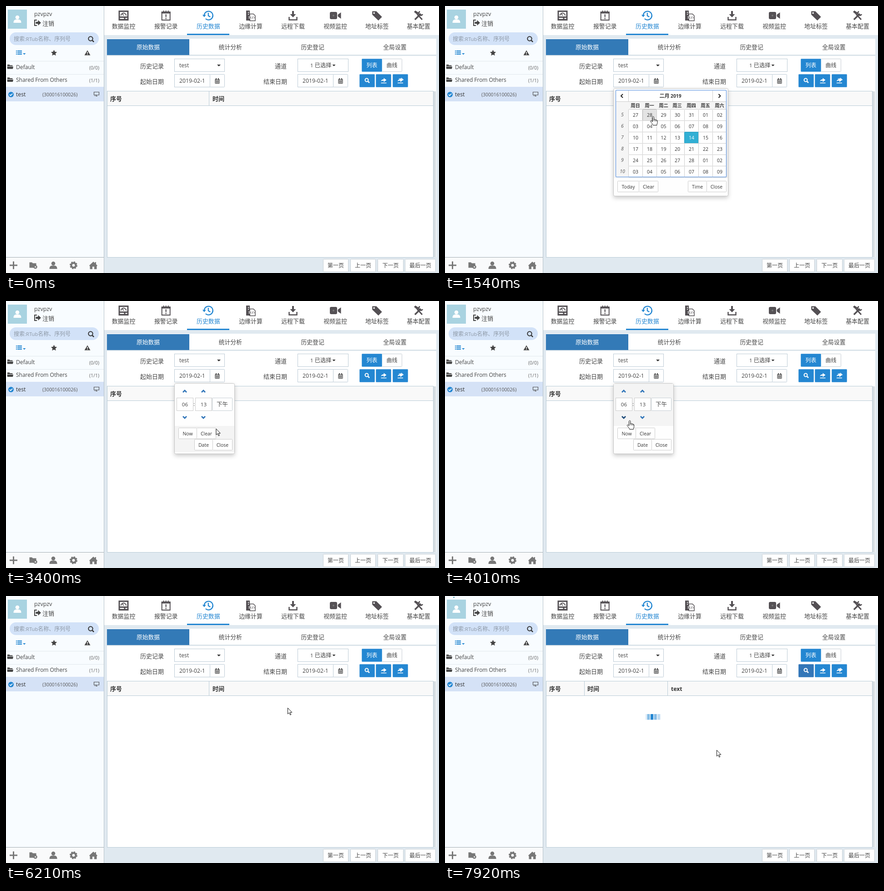
Write an HTML page that moves like this. It is 952 by 588 pixels and loops after 7990 ms.

```html
<!DOCTYPE html>
<html lang="zh">
<head>
<meta charset="utf-8">
<title>历史数据</title>
<style>
html, body { margin: 0; width: 100%; height: 100%; overflow: hidden; background: #e0e9f0; }
svg { display: block; width: 952px; height: 588px; font-family: "Open Sans", "Noto Sans CJK SC", "Noto Sans CJK", sans-serif; }
.s { fill: none; stroke: currentColor; }
.w { fill: #fff; }
.b.hot rect { fill: #e4e4e4; stroke: #a5a5a5; }
.b.down rect { fill: #d2d2d2; stroke: #999; }
.b.p.hot rect, .b.p.down rect { fill: #3276b8; stroke: #5b93c8; }
.b.sel rect { fill: #31afd4; stroke: #269abc; }
.b.arrow rect { fill: none; stroke: none; }
.b.arrow { color: #2f74b8; }
.b.arrow.hot { color: #1c4a78; }
.b.arrow.focus rect { stroke: #7fabe8; stroke-width: 1.5; }
.pop { filter: drop-shadow(0 4px 5px rgba(0, 0, 0, .2)); }
</style>
</head>
<body>
<svg id="stage" viewBox="0 0 952 588"></svg>
<script>
const BLUE = '#2487d2', GREY = '#555', LINE = '#bccbd6', DARK = '#444', LOOP = 7990;

// ---- drawing helpers ----
const rect = (x, y, w, h, fill, more = '') =>
  `<rect x="${x}" y="${y}" width="${w}" height="${h}" fill="${fill}" ${more}/>`;
const box = (x, y, w, h, fill = '#fff', stroke = LINE, more = '') =>
  rect(x + .5, y + .5, w, h, fill, `stroke="${stroke}" ${more}`);
const path = (d, more = '') => `<path d="${d}" ${more}/>`;
const stroke = (d, w = 2) => path(d, `class="s" stroke-width="${w}"`);
const icon = (x, y, color, body) =>
  `<g transform="translate(${x} ${y})" color="${color}" fill="currentColor">${body}</g>`;
// Latin runs are set slightly smaller than the Chinese ones
const text = (x, y, s, size = 13, color = DARK, more = '') =>
  `<text x="${x}" y="${y}" font-size="${size}" fill="${color}" ${more}>` +
  s.replace(/[ -~]+/g, run => `<tspan font-size="${size * .935}">${run}</tspan>`) + '</text>';
const mid = (x, y, s, size, color, more = '') =>
  text(x, y, s, size, color, 'text-anchor="middle" ' + more);
const button = (x, y, w, h, label = '', opt = {}) =>
  `<g class="b ${opt.cls || ''}" ${opt.id ? `id="${opt.id}"` : ''}>` +
  box(x, y, w, h, opt.fill, opt.stroke || '#c6ced4', 'rx="1"') +
  (label && mid(x + w / 2 + .5, y + h / 2 + (opt.size || 12) * .38 + .3, label, opt.size || 12, opt.color)) +
  (opt.body || '') + '</g>';
const bold = 'font-weight="bold"';
const caret = (x, y, color) => path(`M${x} ${y}h8l-4 4z`, `fill="${color}"`);
const cog = (r = 1) => `<g transform="scale(${r})"><circle r="5" class="s" stroke-width="4"/>` +
  '<circle r="7" class="s" stroke-width="3" stroke-dasharray="3.3 2.2"/></g>';
const person = '<circle cy="-4" r="4.3"/>' + path('M-8.5 8c0-7 4-7.5 8.5-7.5s8.5 .5 8.5 7.5z');
const lens = (r, w) => `<circle cx="-1" cy="-1" r="${r}" class="s" stroke-width="${w}"/>` +
  stroke(`M${r * .6} ${r * .6}L${r + 1.5} ${r + 1.5}`, w + .5);
const calendarIcon = stroke('M-4.5-3.5h9v9h-9zM-4.5-1h9M-1.5-1v6.5M1.5-1v6.5M-4.5 2.2h9', 1) +
  stroke('M-2.5-6v3.5M2.5-6v3.5', 1.7);

// ---- sidebar ----
function sidebar() {
  const folder = y => icon(9, y, DARK, path('M-6-5h4.5l1.5 1.5h5.5v2h-11.5zM-6.5-.5h13.5l-1 5h-12z'));
  return rect(0, 0, 215, 553, '#f8fcff') +
    rect(4, 8, 42, 42, '#a9d3e1') + icon(25, 29, '#fff', person) +
    text(62, 21.5, 'pzvpzv', 13.4) +
    icon(69, 37, DARK, stroke('M-1-6h-5v12h5', 2) + path('M-3.5-2.2h5v-3.8l6.5 6-6.5 6v-3.8h-5z')) +
    text(80, 42.5, '注销') +
    rect(8, 58, 196, 28, '#d2e2f8', 'rx="14"') +
    text(17, 76.5, '搜索:RTub名称、序列号', 12, '#8d98a5') + icon(187, 73, '#333', lens(4.7, 2)) +
    icon(28, 103, BLUE, stroke('M-3-4h10M-3-.5h10M-3 3h10', 2) + stroke('M-6-4h2M-6-.5h2M-6 3h2', 2)) +
    path('M37 104h6.5l-3.25 3.3z', `fill="${BLUE}"`) +
    icon(105.5, 103, DARK, path('M0-6.5l2 4.3 4.7.6-3.5 3.2.9 4.7-4.1-2.3-4.1 2.3.9-4.7-3.5-3.2 4.7-.6z')) +
    icon(179, 103, DARK, path('M0-5.5l6.5 11h-13z') + path('M-.8-2h1.6v3.8h-1.6zM-.8 2.7h1.6v1.5h-1.6z', 'class="w"')) +
    rect(0, 121, 215, 1, '#e2e8ed') + rect(0, 150, 215, 1, '#e2e8ed') +
    folder(134) + text(22, 138.7, 'Default') + text(205, 139.5, '(0/0)', 11.2, '#666', 'text-anchor="end"') +
    folder(162.5) + text(22, 167.2, 'Shared From Others', 12.8) + text(205, 168, '(1/1)', 11.2, '#666', 'text-anchor="end"') +
    rect(0, 178, 215, 32, '#d5e2f6') +
    icon(11, 195, BLUE, '<circle r="6"/><path d="M-3 0l2.3 2.3 4-4.3" fill="none" stroke="#fff" stroke-width="1.8"/>') +
    text(22, 199, 'test', 13.1, '#333') + text(80, 199, '(300016100026)', 11.1, GREY) +
    icon(199, 194, GREY, stroke('M-5.5-4.5h11v6.5h-11zM-2 4.5h4M0 2v3', 1.2) + stroke('M-4.5 4.5l3-3', 1)) +
    rect(0, 553, 215, 35, '#f9fafb') + rect(0, 553, 215, 1, '#a3adb3') +
    icon(16.5, 571, '#777', stroke('M-8.5 0h17M0-8.5v17', 3)) +
    icon(60, 571, '#777', path('M-8.5-6.5h5.5l2 2h7.5v4l-6 6h-9z') + icon(4.5, 3.5, '#777', cog(.52))) +
    icon(104, 571, '#777', person) +
    icon(148.5, 571, '#777', cog()) +
    icon(192, 571, '#777', path('M-9 .5L0-8l3.5 3.3v-2.3h2.5v4.7L9 .5 7.5 2v6.5h-5.5v-5.5h-4v5.5h-5.5v-6.5z')) +
    rect(215, 0, 1, 588, '#b4c0c8');
}

// ---- top navigation ----
function topNav() {
  const items = [
    ['数据监控', 258.5, path('M-11-11h22v22h-22z') + path('M-8-8h16v10h-16z', 'class="w"') +
      stroke('M-5.5 0a5.5 5.5 0 0 1 11 0M0 0l-2.5-3.5', 1.8) + path('M-8 5h9v2.5h-9zM4 5h4v2.5h-4z', 'class="w"')],
    ['报警记录', 351.7, stroke('M-9-7.5h18v17.5h-18z', 2) + path('M-10-8.5h20v4h-20z') +
      stroke('M-5-11v4M0-11v4M5-11v4', 2) + path('M-1.3-2.5h2.6l-.5 6.5h-1.6zM-1.3 5.5h2.6v2.3h-2.6z')],
    ['历史数据', 444.8, stroke('M-9 0a9.5 9.5 0 1 1 3 7', 2.3) + path('M-13-1.5h8l-4 5z') + stroke('M0-6v6.5l4.5 2.5', 2.2)],
    ['边缘计算', 538, path('M-10-11h8v12h-2v6h3v4h-9z') + path('M-6-8h2v2h-2zM-6-4h2v2h-2z', 'class="w"') +
      stroke('M-2-3.5h8l4 4v11h-12z', 1.5) + stroke('M1.5 2.5l-2 2 2 2M6.5 2.5l2 2-2 2M4.8 2l-1.5 5', 1)],
    ['远程下载', 631, path('M-2-10h4v7h4.5l-6.5 7-6.5-7h4.5z') + stroke('M-8.5 3v6.5h17v-6.5', 2.5)],
    ['视频监控', 724, '<rect x="-12" y="-8" width="16" height="16" rx="3"/>' + path('M5.5-2l7-5v14l-7-5z') +
      '<circle cx="-4" r="2" fill="#777"/>'],
    ['地址标签', 815.7, path('M-10.5-9.5h9l12.5 12.5-8 8-13.5-13z') + '<circle cx="-6.5" cy="-5.5" r="1.8" class="w"/>'],
    ['基本配置', 907, stroke('M-8 9L5-4', 3.5) + stroke('M3-9a4.5 4.5 0 1 0 6 6', 2.8) +
      path('M-10-8l3-3 8 5-4 4z') + stroke('M-3-3L8 9', 3)]
  ];
  return rect(216, 0, 736, 64, '#fff') + rect(398, 61, 93, 3, BLUE) +
    items.map(([name, x, body], i) => {
      const color = i === 2 ? BLUE : '#545054';
      return icon(x, 21, color, body) + mid(x, 49.3, name, 12.9, i === 2 ? BLUE : DARK);
    }).join('');
}

// ---- filter form and table ----
function panel() {
  const blue = { cls: 'p', fill: BLUE, stroke: '#5fa6dd' };
  const dateField = (x, id) => box(x, 150, 78, 28) + text(x + 11, 169, '2019-02-1', 13.1) +
    button(x + 78, 150, 32, 28, '', { id, stroke: LINE, body: icon(x + 94.5, 165, '#333', calendarIcon) });
  const share = (x, extra = '') => icon(x, 164.5, '#fff',
    path('M-6 1c1-3.5 4-4 6-4v-3l6 4.5-6 4.5v-3c-2 0-4 0-6 1z') + stroke('M-6 5h12', 1.5) + extra);
  const tools = [icon(794, 164, '#fff', lens(3.5, 2)), share(830.5), share(867, stroke('M-3-5l4 3M2-6l5 4.5', 1.3))];
  const pages = [[697, 55, '第一页'], [757, 55, '上一页'], [817, 56, '下一页'], [877, 67, '最后一页']];
  const heading = (x, s) => text(x, 208.5, s, 13, '#333', bold);
  const divider = x => rect(x, 188, 1, 31, '#b9cbd6');
  return rect(222, 72, 724, 115, '#fff') + rect(222, 107, 724, 3, '#dce5eb') +
    rect(222, 73, 181, 35, '#337ab7') +
    ['原始数据', '统计分析', '历史登记', '全局设置'].map((s, i) =>
      mid(312.5 + 180.8 * i, 95, s, 12.8, i ? DARK : '#fff')).join('') +
    text(295, 136.5, '历史记录') + text(295, 170.5, '起始日期') + text(591, 136.5, '通道') + text(566, 170.5, '结束日期') +
    box(370, 116, 110, 28) + text(381, 135, 'test') + caret(464, 129, '#333') +
    box(641, 116, 111, 28) + text(669, 135, '1 已选择', 12.3) + path('M717.5 129h7l-3.5 3.7z', 'fill="#333"') +
    dateField(370, 'pick') + dateField(641, 'pick2') +
    button(826, 116, 44, 28, '曲线') +
    button(782, 116, 44, 28, '列表', { ...blue, color: '#fff' }) +
    tools.map((body, i) => button(777 + 36.6 * i | 0, 150, 33, 28, '', { ...blue, id: 'tool' + i, body })).join('') +
    rect(222, 187, 724, 366, '#fff') + rect(222, 188, 718, 31, '#f9f9f9') +
    rect(940, 188, 5, 365, '#d6dde2') + box(222, 187, 717, 366, 'none', '#b9cbd6') + rect(222, 219, 718, 1, '#b9cbd6') +
    heading(229, '序号') +
    `<g id="colsA">${divider(446)}${heading(454, '时间')}</g>` +
    `<g id="colsB">${divider(306)}${divider(489)}${heading(313, '时间')}${heading(497, 'text')}` +
      rect(18, 2, 3, 2, '#4d9fb5') + '<g id="busy"></g></g>' +
    pages.map(([x, w, s]) => button(x, 557, w, 28, s)).join('');
}

// ---- popups ----
const popup = (w, h) => `<g class="pop">${box(370, 181, w, h, '#fefefe', '#c4c4c4', 'rx="3"')}</g>`;
const small = { size: 11.2, color: '#333', stroke: '#ccc' };

function calendar() {
  const colX = c => Math.round(403 + 30.8 * c);
  let s = popup(252, 237) + rect(371, 185, 251, 194, '#f5f5f5') + rect(375, 186, 244, 24, '#fff') +
    rect(403, 186, 1, 24, '#ccc') + rect(588, 186, 1, 24, '#ccc') + rect(375, 210, 244, 1, '#ccc') +
    icon(389, 198, '#222', stroke('M2-4l-4 4 4 4')) + icon(603.5, 198, '#222', stroke('M-2-4l4 4-4 4')) +
    mid(495.5, 202.3, '二月 2019', 11, '#333', bold);
  [...'日一二三四五六'].forEach((d, c) => s += mid(colX(c) + 15.5, 223.2, '周' + d, 10.3, '#333', bold));
  for (let i = 0; i < 42; i++) {
    const c = i % 7, y = 227 + 25 * (i / 7 | 0), sel = i === 18;
    const day = new Date(2019, 0, 27 + i).getDate();
    if (!c) s += mid(390, y + 16.3, '' + (5 + i / 7), 11.2, GREY, 'font-style="italic"');
    s += button(colX(c), y, colX(c + 1) - colX(c), 25, String(day).padStart(2, '0'),
      { ...small, color: sel ? '#fff' : '#333', cls: sel ? 'sel' : '' });
  }
  return s + box(375, 185, 243, 191, 'none', '#7fabe8', 'rx="2" stroke-width="1.5"') +
    button(379, 385, 47, 24, 'Today', small) + button(426, 385, 42, 24, 'Clear', small) +
    button(534, 385, 41, 24, 'Time', small) + button(575, 385, 43, 24, 'Close', small);
}

function clock() {
  const arrow = (x, y, dir, id) => button(x - 17, y - 14, 33, 29, '',
    { cls: 'arrow', id, body: stroke(`M${x - 4} ${y - 2 * dir}l4 ${4 * dir} 4 ${-4 * dir}`, 2.7) });
  return popup(132, 155) + '<rect id="row" x="371" width="131" fill="#f4f4f4"/>' +
    arrow(393, 199, -1) + arrow(434, 199, -1) + arrow(393, 256, 1, 'less') + arrow(434, 256, 1) +
    box(375, 213, 36, 28, '#fff', '#ccc') + box(416, 213, 36, 28, '#fff', '#ccc') +
    `<g id="hour">${mid(393.5, 232, '06', 12.5)}</g>` + mid(434.5, 232, '13', 12.5) + mid(413.5, 231, ':', 12.5) +
    button(453, 213, 44, 28, '下午', { size: 12.5 }) +
    button(379, 279, 40, 24, 'Now', small) + button(419, 279, 42, 24, 'Clear', small) +
    button(414, 304, 40, 24, 'Date', small) + button(454, 304, 43, 24, 'Close', small);
}

// ---- pointer ----
const pointer = '<g id="pointer" stroke="#111" fill="#fff" stroke-linejoin="round">' +
  path('M.5 .5V13.8L3.6 11l2.2 5 2-.9-2.2-4.8h4.2z', 'id="arrow"') +
  `<g id="hand">${path('M-2 2C-2-.3 1.2-.3 1.2 2V7.2C1.6 6 4 6.2 4.2 7.8C5 6.8 6.9 7.2 7 8.8' +
    'C7.8 8 9 8.6 9 10V13.5C9 15.5 7.8 16.5 7.8 19.5H-.8C-1 17-4.6 14-6 11.5C-6.8 9.6-4.4 9-3.2 10.6L-2 12Z')}` +
  path('M-2 11V3M1.2 7v3.5M4.2 8v3M7 9v2', 'fill="none"') + '</g></g>';

const stage = document.getElementById('stage');
stage.innerHTML = rect(0, 0, 952, 588, '#e0e9f0') + sidebar() + topNav() + panel() +
  `<g id="cal">${calendar()}</g><g id="clock">${clock()}</g>` + pointer;

const $ = id => document.getElementById(id);
const show = (el, on) => el.style.display = on ? '' : 'none';
const hots = [...stage.querySelectorAll('.b')].map(el => {
  const [x, y, w, h] = ['x', 'y', 'width', 'height'].map(a => +el.firstChild.getAttribute(a));
  return { el, layer: el.parentNode, x, y, w, h };
});

// Pointer legs: start, end, steps, then x,y points spread evenly over the leg
const legs = [
  [140, 910, 11, 712, 518, 640, 420, 550, 310, 488, 215, 470, 171],
  [980, 980, 1, 466, 172],
  [1470, 2090, 9, 462, 195, 458, 243, 412, 290, 440, 340, 520, 342, 598, 330, 550, 285, 490, 295, 456, 312],
  [2230, 2230, 1, 453, 314],
  [3090, 3870, 11, 453, 314, 454, 308, 461.5, 281, 445, 278, 428, 270, 418, 267],
  [3940, 4470, 8, 412, 265, 393, 258, 393, 258],
  [5500, 5730, 4, 430, 258, 609, 247],
  [6210, 6970, 11, 619, 246, 700, 215, 800, 185, 880, 145, 902, 130, 848, 127],
  [7060, 7210, 3, 830, 150, 797, 168],
  [7440, 7920, 7, 795, 185, 720, 240, 640, 310, 597, 339]
];

function pointerAt(t) {
  const [from, to, n, ...p] = legs.filter(l => l[0] <= t).pop() || legs[0];
  if (n < 2) return p;
  const k = Math.min(n - 1, Math.floor((t - from + 12) / ((to - from) / (n - 1))));
  const u = k / (n - 1) * (p.length / 2 - 1), i = Math.min(Math.floor(u), p.length / 2 - 2), f = u - i;
  return [0, 1].map(a => p[2 * i + a] * (1 - f) + p[2 * i + 2 + a] * f);
}

const clicks = [4400, 4640, 4790, 4960, 5180, 5350];
let lastHour = '';

function busyBars(t) {
  const step = Math.floor((t - 7440 + 12) / 80), shift = (6 - step) * 1.9 % 7.6;
  let s = '';
  for (let i = -1; i < 6; i++) {
    const x = 436.7 + 7.6 * i + shift, a = Math.max(x, 441.5), b = Math.min(x + 6.2, 473.7);
    if (b > a) s += rect(a, 260, b - a, 12.5, BLUE, `opacity="${Math.max(.28, 1 - Math.abs(x - 452) / 17)}"`);
  }
  return s;
}

function draw(t) {
  const [x, y] = pointerAt(t);
  const calOn = t >= 1300 && t < 3180, clockOn = t >= 3180 && t < 5960, loaded = t >= 7440;
  show($('cal'), calOn);
  show($('clock'), clockOn);
  show($('colsA'), !loaded);
  show($('colsB'), loaded);
  if (loaded) $('busy').innerHTML = busyBars(t);

  let over = false;
  for (const h of hots) {
    const live = t >= 140 && h.layer.style.display !== 'none' &&
      x >= h.x && x < h.x + h.w && y >= h.y && y < h.y + h.h;
    h.el.classList.toggle('hot', live);
    over = over || live;
  }
  $('pick').classList.toggle('down', t >= 1150 && t < 1300);
  $('tool0').classList.toggle('down', t >= 7210);
  $('less').classList.toggle('focus', t >= clicks[0]);

  const low = y >= 275;
  $('row').setAttribute('y', low ? 275 : 182);
  $('row').setAttribute('height', low ? 58 : 93);
  show($('row'), x < 503);
  const hour = String(6 - clicks.filter(c => c <= t).length || 12).padStart(2, '0');
  if (hour !== lastHour) $('hour').innerHTML = mid(393.5, 232, lastHour = hour, 12.5);

  show($('pointer'), t >= 140);
  show($('hand'), over);
  show($('arrow'), !over);
  $('pointer').setAttribute('transform', `translate(${x} ${y})`);
}

const t0 = performance.now();
function tick() {
  draw((performance.now() - t0) % LOOP);
  requestAnimationFrame(tick);
}
tick();
</script>
</body>
</html>
```
